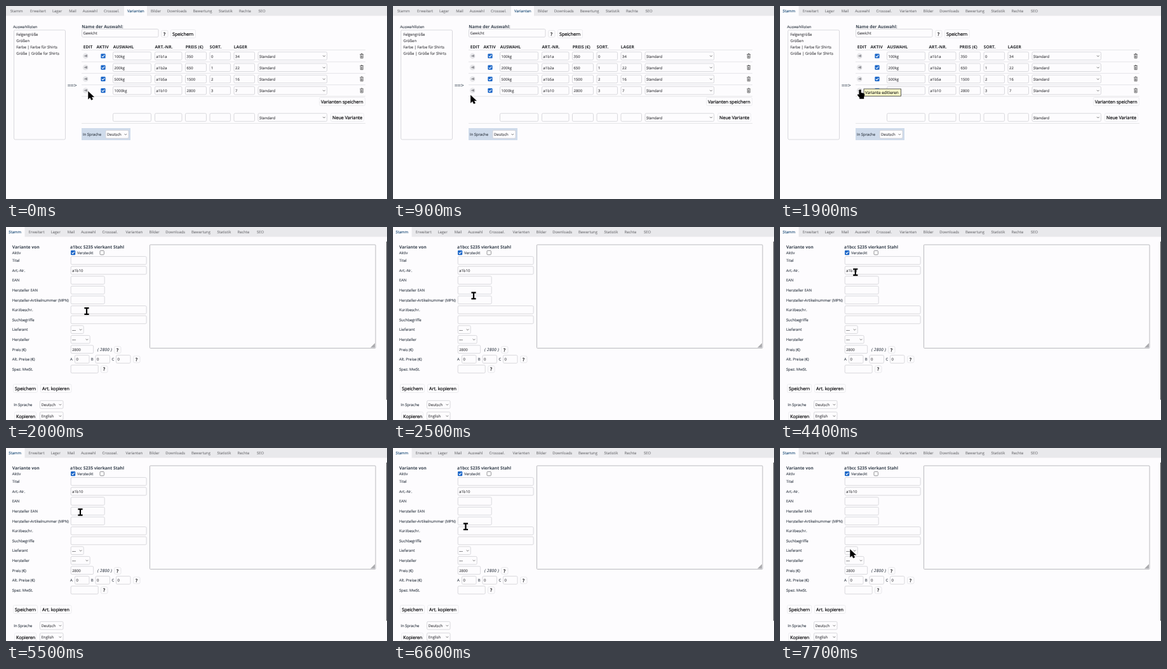
These frames come from a looping animation (600 by 305 pixels, 8 s). An HTML page:

```html
<!DOCTYPE html>
<html lang="de">
<head>
<meta charset="utf-8">
<title>Varianten</title>
<style>
  html, body { margin: 0; width: 100%; height: 100%; overflow: hidden; background: #fdfcfe; }
  svg { display: block; width: 600px; height: 305px; }
  text {
    font: 5.93px "Open Sans", "Noto Sans", sans-serif; white-space: pre; text-rendering: geometricPrecision;
    --ink: #3c444f; fill: var(--ink); stroke: var(--ink); stroke-width: .14px;
  }
  .bold { font-size: 6.72px; font-weight: 700; --ink: #36404d; stroke-width: 0; }
  .heading { font-size: 6.6px; font-weight: 700; --ink: #26282c; stroke-width: 0; }
  .button { font-size: 7.15px; --ink: #0c0c0e; stroke-width: .22px; }
  .tab { --ink: #707074; stroke-width: .08px; }
  .active { --ink: #23527c; }
  .value { --ink: #48484c; }
  .italic { font-size: 6.4px; font-style: italic; letter-spacing: .25px; }
  .tip { font-size: 6.35px; --ink: #222; }
  .arrow { font: 8px "DejaVu Sans Mono", monospace; --ink: #55606c; }
</style>
</head>
<body>
<svg id="stage" viewBox="0 0 600 305"></svg>
<script>
const LOOP = 8000, STEP = 100;
const PAPER = '#fdfcfe', EDGE = '#d0d0d5';
const stage = document.getElementById('stage');

// Text is placed by the vertical centre of its capitals.
const text = (x, y, value, cls = '') =>
  `<text x="${x}" y="${y + (cls === 'button' ? 2.5 : 2.2)}" class="${cls}">${value}</text>`;
const rect = (x, y, w, h, fill, stroke = 'none', r = 0) =>
  `<rect x="${x}" y="${y}" width="${w}" height="${h}" rx="${r}" fill="${fill}" stroke="${stroke}" stroke-width=".8"/>`;
const path = (d, stroke, width = 1, fill = 'none') =>
  `<path d="${d}" fill="${fill}" stroke="${stroke}" stroke-width="${width}"/>`;
const rule = y => path(`M119 ${y}H566`, '#e2e2e6', .9);

const field = (x, cy, w, value = '') =>
  rect(x + .5, cy - 6.3, w - 1, 12.6, PAPER, EDGE, 1.8) + text(x + 2.5, cy + .3, value, 'value');
const select = (x, cy, w, value) =>
  field(x, cy, w, value) + path(`M${x + w - 7} ${cy - .8}l1.8 1.8l1.8-1.8`, '#555', .8);
const button = (x, y, w, value, pad = 3) =>
  rect(x + .5, y + .5, w - 1, 13, PAPER, '#e9e9ed', 2) + text(x + pad, y + 7.2, value, 'button');
const help = (x, cy) =>
  rect(x + .5, cy - 5, 10.5, 10.5, PAPER, '#e2e2e6', 2) + text(x + 4, cy + .3, '?', 'button');
const checkbox = (x, cy, checked) => checked
  ? rect(x, cy - 3.6, 7.2, 7.2, '#1a66c8', 'none', 1.2) + path(`M${x + 1.6} ${cy + .1}l1.5 1.5l2.7-3.2`, '#fff', 1.1)
  : rect(x + .5, cy - 3.2, 6.4, 6.4, '#fff', '#77777c', 1.2);
const trash = cy =>
  path(`M557.3 ${cy - 2.6}H563M559.2 ${cy - 3.5}h2`, '#555', 1) +
  path(`M558.2 ${cy - 1.8}v5.2h4v-5.2M559.6 ${cy - 1}v3.6M560.9 ${cy - 1}v3.6`, '#555', .8);
const editIcon = cy =>
  `<circle cx="125.3" cy="${cy}" r="4.4" fill="#e7e7ea"/>` +
  path(`M122.6 ${cy}l3-1.6l2.4-.6v4l-2.4-.6z`, 'none', 0, '#97979d');

function tabBar(active, shift, tabLeft, tabWidth) {
  const tabs = { Stamm: 6.8, Erweitert: 38, Lager: 73, Mail: 99.2, Auswahl: 120.7, 'Crosssel.': 154, Varianten: 191,
    Bilder: 228, Downloads: 253.8, Bewertung: 294.5, Statistik: 335, Rechte: 367, SEO: 397.5 };
  return rect(0, 0, 600, 15.5, '#e9e9ec') + rect(tabLeft, 0, tabWidth, 16, PAPER) +
    Object.entries(tabs).map(([name, x]) =>
      text(x - shift, 7.6, name, name === active ? 'active' : 'tab')).join('');
}

function variantList() {
  const columns = [[168, 61], [234, 43.5], [282, 34], [320.5, 33.5], [358.5, 33.5]];
  const rows = [
    ['100kg', 'a1b1a', 350, 0, 34], ['200kg', 'a1b2a', 650, 1, 22],
    ['500kg', 'a1b5a', 1500, 2, 16], ['1000kg', 'a1b10', 2800, 3, 7]];
  const headings = [[121.8, 'EDIT'], [142.5, 'AKTIV'], [168.7, 'AUSWAHL'], [234.5, 'ART.-NR.'],
    [282.7, 'PREIS (€)'], [320.8, 'SORT.'], [358.8, 'LAGER']];
  const fields = (cy, values = []) =>
    columns.map(([x, w], i) => field(x, cy, w, values[i])).join('') + select(396.5, cy, 109.5, 'Standard');

  return text(11.3, 33, 'Auswahllisten') + rect(12.5, 38, 81, 173, PAPER, EDGE, 2) +
    ['Felgengröße', 'Größen', 'Farbe | Farbe für Shirts', 'Größe | Größe for Shirts']
      .map((item, i) => text(16.2, 44.8 + i * 10.1, item, 'value')).join('') +
    text(97, 125.5, '==&gt;', 'arrow') +
    text(119.3, 32.7, 'Name der Auswahl:', 'bold') + field(119, 42.8, 121.5, 'Gewicht') +
    help(244, 43.7) + button(259, 37, 40, 'Speichern') +
    headings.map(([x, name]) => text(x, 64.3, name, 'heading')).join('') + rule(69.5) +
    rows.map((row, i) => {
      const cy = 79 + i * 18.2;
      return editIcon(cy) + checkbox(149.4, cy, true) + fields(cy, row) + trash(cy) + rule(cy + 9.2);
    }).join('') +
    button(493, 144, 73, 'Varianten speichern') +
    fields(176) + button(511, 169, 53, 'Neue Variante') + rule(185.5) +
    rect(119, 193, 77, 19, '#cfdbeb') + text(121, 202.8, 'In Sprache') + select(156.5, 202.8, 37, 'Deutsch');
}

const rowY = i => 52.9 + i * 15.6;
const textFields = [[0, 120, ''], [1, 120, 'a1b10'], [2, 54, ''], [3, 54, ''], [4, 54, ''], [5, 120, ''], [6, 120, '']];

function variantForm() {
  const labels = ['Titel', 'Art.-Nr.', 'EAN', 'Hersteller EAN', 'Hersteller-Artikelnummer (MPN)', 'Kurzbeschr.',
    'Suchbegriffe', 'Lieferant', 'Hersteller', 'Preis (€)', 'Alt. Preise (€)', 'Spez. MwSt.'];
  return text(9.8, 31.6, 'Variante von', 'bold') + text(101, 31.6, 'a1bcc S235 vierkant Stahl', 'bold') +
    text(9.8, 40.6, 'Aktiv') + checkbox(102, 40.6, true) + text(112, 40.6, 'Versteckt') + checkbox(147.5, 40.6, false) +
    labels.map((label, i) => text(9.8, rowY(i), label)).join('') +
    textFields.map(([i, w, value]) => field(101.7, rowY(i), w, value)).join('') +
    select(101.7, rowY(7), 21, '---') + select(101.7, rowY(8), 31, '---') +
    field(101.7, rowY(9), 36.5, '2800') + text(144, rowY(9), '( 2800 )', 'italic') + help(170, rowY(9) + .5) +
    ['A', 'B', 'C'].map((name, i) =>
      text(101 + i * 32.7, rowY(10), name) + field(108 + i * 32.5, rowY(10), 23.5, '0')).join('') +
    help(200, rowY(10)) + field(101.7, rowY(11), 44, '') + help(149, rowY(11)) +
    rect(226.5, 28, 355.5, 163.5, PAPER, '#a9a9ae', 1) +
    path('M574 190.5L581 183.5V190.5Z', 'none', 0, '#aaaaae') +
    button(11, 248, 39, 'Speichern') + button(54, 248, 49.5, 'Art. kopieren') +
    text(12.3, 280.6, 'In Sprache') + select(53, 280.6, 37.5, 'Deutsch') +
    button(13, 291.8, 35, 'Kopieren') + select(53, 298.6, 37.5, 'English') +
    rect(599, 23, 1, 250, '#4c4c50');
}

const tooltip = rect(132, 131, 58.5, 11.3, '#fbfacb', '#333') + text(134, 136.7, 'Variante editieren', 'tip');

// Cursor shapes, drawn around their hot spot.
const cursors = {
  arrow: path('M0 0V12.2L2.8 9.6L4.9 13.6L7.3 12.4L5.3 8.7H9.2Z', '#000', .4, '#000'),
  beam: path('M-3.6-4.8H3.6M-3.6 4.8H3.6M0-4.8V4.8', '#000', 2.2),
  hand: path('M-1.3.8Q0-.8 1.3.8V4.6L6 5.8Q7.2 6.3 7 8L6 11.2V14H-.6V12.2L-3.8 8.4Q-3.8 6.8-2.4 7.2L-1.3 8.2Z', '#000', .5, '#000')
};

// Time, x, y of the pointer's resting and turning points.
const route = [
  [0, 129.5, 135], [900, 122.3, 141], [1400, 126, 132.5], [1900, 126, 132.5], [2000, 127, 133],
  [2300, 127, 133], [2500, 127, 108.5], [3200, 106, 41], [3300, 106, 41], [3800, 116.8, 55.5],
  [4100, 116.8, 55.5], [4400, 118.8, 71.3], [4700, 118.8, 71.3], [5000, 118.2, 81], [5200, 118.2, 81],
  [5500, 117, 101.4], [5800, 117, 101.4], [6100, 115.8, 113], [6200, 115.8, 113], [6800, 114, 128],
  [6900, 114, 128], [7200, 113.5, 145], [7400, 113.5, 145], [7700, 110.5, 160.3], [LOOP, 110.5, 160.3]];

function pointerAt(t) {
  const next = route.findIndex(point => point[0] > t);
  const [t0, x0, y0] = route[next - 1], [t1, x1, y1] = route[next];
  const k = (t - t0) / (t1 - t0), eased = k * k * (3 - 2 * k);
  return [x0 + (x1 - x0) * eased, y0 + (y1 - y0) * eased];
}

function cursorShape(t, x, y) {
  if (t < 2000) return t > 1000 && y < 137 ? 'hand' : 'arrow';
  const overField = textFields.some(([i, w]) => x > 102 && x < 102 + w && Math.abs(y - rowY(i)) < 8);
  return overField ? 'beam' : 'arrow';
}

const listTabs = tabBar('Varianten', 0, 186, 36);
const formTabs = tabBar('Stamm', 2.5, 0, 29.5);
const list = variantList(), form = variantForm();
let drawn = -1;

function draw(now) {
  const t = Math.floor(now % LOOP / STEP) * STEP;
  if (t !== drawn) {
    drawn = t;
    const [x, y] = pointerAt(t);
    stage.innerHTML = (t < 1900 ? listTabs : formTabs) + (t < 2000 ? list : form) +
      (t >= 1500 && t < 2000 ? tooltip : '') +
      `<g transform="translate(${x} ${y})">${cursors[cursorShape(t, x, y)]}</g>`;
  }
}

const start = performance.now();
function tick() {
  draw(performance.now() - start);
  requestAnimationFrame(tick);
}
tick();
</script>
</body>
</html>
```
